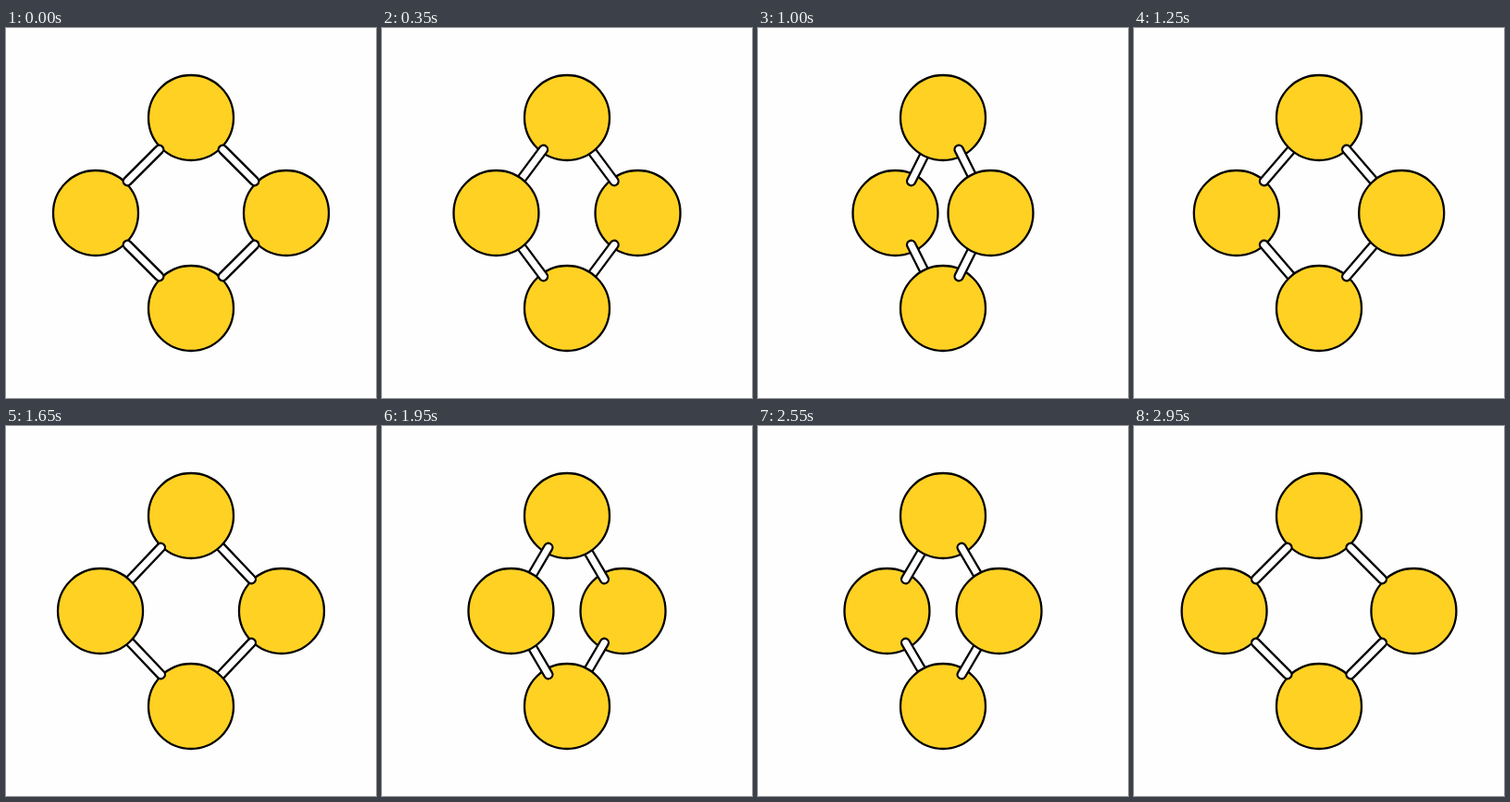
An HTML page with a canvas for the animation above (3000 ms loop, 400 by 400 pixels).

```html
<!DOCTYPE html>
<html lang="en">
<head>
<meta charset="utf-8">
<title>Turning ring</title>
<style>
html, body { margin: 0; width: 100%; height: 100%; overflow: hidden; background: #fefefe; }
canvas { display: block; width: 400px; height: 400px; }
</style>
</head>
<body>
<canvas id="stage" width="400" height="400"></canvas>
<script>
const ctx = document.getElementById('stage').getContext('2d');
const LOOP = 3000, STEP = 50;
const REACH = 103, RADIUS = 46, ROD = 9.2, LINE = 2.3;
const ROD_LIFT = 6; // rods sit slightly nearer than their axis

function ball({ x, y }) {
  ctx.beginPath();
  ctx.arc(x, y, RADIUS, 0, 2 * Math.PI);
  ctx.fillStyle = '#ffd123';
  ctx.fill();
  ctx.lineWidth = LINE;
  ctx.strokeStyle = '#000';
  ctx.stroke();
}

// The middle third of the segment between two balls
function rod(a, b) {
  const mix = (p, q) => p + (q - p) / 3;
  ctx.beginPath();
  ctx.moveTo(mix(a.x, b.x), mix(a.y, b.y));
  ctx.lineTo(mix(b.x, a.x), mix(b.y, a.y));
  for (const [width, color] of [[ROD + LINE, '#000'], [ROD - LINE, '#fff']]) {
    ctx.lineWidth = width;
    ctx.strokeStyle = color;
    ctx.stroke();
  }
}

function draw(time) {
  const angle = Math.floor(time % LOOP / STEP) * STEP / LOOP * 2 * Math.PI;
  const dx = REACH * Math.cos(angle), dz = REACH * Math.sin(angle);
  const poles = [-1, 1].map(s => ({ x: 200, y: 200 + s * REACH, z: 0 }));
  const sides = [-1, 1].map(s => ({ x: 200 + s * dx, y: 200, z: -s * dz }));

  const parts = [...poles, ...sides].map(p => ({ z: p.z, paint: () => ball(p) }));
  for (const pole of poles) for (const side of sides) {
    parts.push({ z: side.z / 2 + ROD_LIFT, paint: () => rod(pole, side) });
  }

  ctx.fillStyle = '#fefefe';
  ctx.fillRect(0, 0, 400, 400);
  ctx.lineCap = 'round';
  parts.sort((a, b) => a.z - b.z).forEach(part => part.paint());
}

const start = performance.now();
function tick() {
  draw(performance.now() - start);
  requestAnimationFrame(tick);
}
tick();
</script>
</body>
</html>
```
